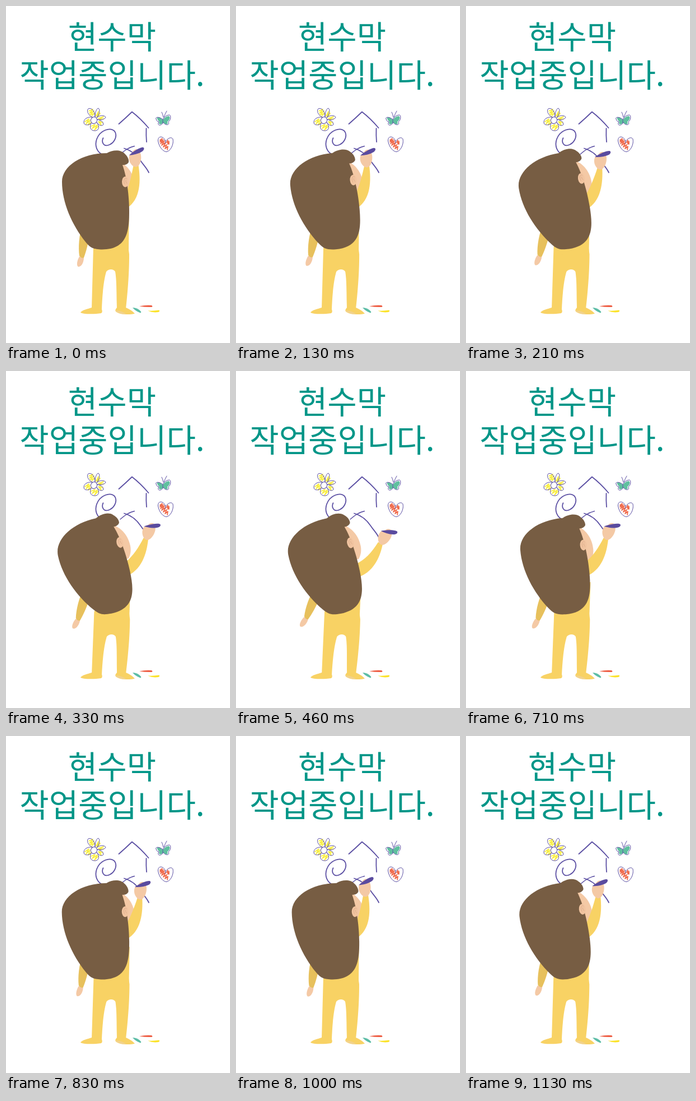
Write an HTML page that moves like this. It is 400x600 px and loops after 1.18 s.

```html
<!DOCTYPE html>
<html lang="ko">
<head>
<meta charset="utf-8">
<title>현수막 작업중입니다.</title>
<style>
html, body { margin: 0; width: 100%; height: 100%; overflow: hidden; background: #fff; }
svg { display: block; width: 100vw; height: 100vh; }
text { font: 400 57px "Noto Sans CJK KR", "Noto Sans CJK", sans-serif; fill: #009688; text-anchor: middle; }
.ink { fill: none; stroke: #5b4fa3; stroke-width: 1.8; stroke-linecap: round; stroke-linejoin: round; }
.thin { stroke-width: 1; }
.wax { fill: none; stroke-width: 1.7; stroke-linecap: round; stroke-linejoin: round; }
.cloth { fill: #f8d264; }
.skin { fill: #f4c9a5; }
</style>
</head>
<body>
<svg viewBox="0 0 400 600">
  <text x="189.5" y="75.5">현수막</text>
  <text x="189.5" y="143.5">작업중입니다.</text>

  <g id="flower">
    <path class="wax" stroke="#f9ee3e" d="M148 187l7-3-6 7 8-4-7 7 8-3-5 5M161 196l4-8-2 10 5-7M165 200l9-3-8 5 8-1M165 206l5 6-3-7 5 3M152 214l7-3-5 7 9-6-5 9 7-7M141 206l7-5-5 9 7-7-3 9 5-5"/>
    <g class="ink thin">
      <path d="M154 198C147 195 143 186 147 183C153 180 159 188 159 197"/>
      <path d="M159 197C159 189 162 182 165 182C169 185 166 194 162 199"/>
      <path d="M162 199C166 194 176 194 178 198C177 202 169 203 163 202"/>
      <path d="M163 202C169 203 174 206 174 211C171 215 165 212 162 207"/>
      <path d="M162 207C167 213 167 221 160 222C152 223 148 217 152 209"/>
      <path d="M152 209C147 213 139 213 139 207C139 200 147 197 154 198"/>
      <ellipse cx="157" cy="203.500" rx="5.500" ry="6" transform="rotate(25 157 203.500)"/>
    </g>
  </g>

  <g id="house" class="ink">
    <path d="M201.500 210Q213 200 225 188.500Q240 200 254.500 217"/>
    <path d="M250.500 218Q250 230 251 242"/>
  </g>

  <g id="butterfly">
    <path fill="#5fbf9f" d="M280 203C276 197 268 197 270 201Q272 205 274 206C271 211 277 213 281 207C284 212 291 212 288 206C293 203 294 196 290 196Q284 197 280 203Z"/>
    <g class="ink thin">
      <path d="M280 202C275 197 266 197 268 201Q269 206 273 206C269 212 276 216 281 207C284 213 293 213 290 206C295 203 295 193 291 194Q284 195 280 202V208"/>
      <path d="M281 198Q280 192 278 189M282 198Q284 192 287 187"/>
    </g>
  </g>

  <g id="heart">
    <path class="wax" stroke="#f0694a" d="M275 239l4-3-4 6 6-4-5 7 7-5-5 8 7-5-4 8 6-4-3 7 5-4-1 6M287 243l2-4 0 7 2-5 0 5"/>
    <path class="ink thin" d="M285 241C282 231 271 230 271.500 240C273 251 281 260 287 259.500C294 258 300 246 298 237C296 232 286 235 284 245"/>
  </g>

  <g id="lines" class="ink">
    <path d="M173.500 235C170 242 174 250 182 248C193 245 200 232 194 223C186 215 168 221 162 237C158 248 162 259 171 264"/>
    <path stroke-width="1.300" d="M204 264Q217 252 229.500 249.500"/>
    <path d="M211 253.500C224 257 233 265 240 275C246 284 251 288 255 296.500"/>
  </g>

  <g id="crayons">
    <path fill="#ee5f45" d="M238 534.500Q250 532 260 533Q263 535 260 536Q249 536.500 238 534.500Z"/>
    <path fill="#5cbda6" d="M226 537Q235 537 241 544Q242 547 239 546Q231 543 226 537Z"/>
    <path fill="#fbe32a" d="M253.500 542.500Q264 543 273 541.500Q276 543 272 545Q261 546.500 253.500 542.500Z"/>
  </g>

  <g id="leftArm">
    <path class="skin" d="M131 446C127 453 125.500 461 128.500 464C134 465.500 139 457 139 448Z"/>
    <path fill="#e7c05c" d="M137 388C130 408 129 430 131 445Q135 450 139 448C143 438 147 422 149 408L155 390Z"/>
  </g>

  <path class="cloth" d="M153 537C144 540 137 541 133 545.500C136 549 158 549 170 547Q173 545 171 540ZM198 537Q194 541 196 544C203 550 222 550 230 547.500Q224 541 214 537Z"/>
  <path fill="#f2d28b" d="M195 542Q204 541 215 548.500Q201 549.500 195 542Z"/>
  <path id="legs" class="cloth" d="M156 428L153 539Q162 544 171 540C172 515 174 490 179 473C183 467.500 192 467.500 195 473C198 490 197 515 198 538Q206 543 214 539C217 510 220 480 220 442L218 428Z"/>
  <path id="torso" class="cloth" d="M158 375L156.500 440Q188 448 219 440L219.500 375Z"/>

  <path id="face" class="skin" d="M204 278C222 287 230 305 230 322C230 332 226 340 222 344L205 344Z"/>
  <path id="sleeve" class="cloth"/>
  <g id="hand">
    <path class="skin" d="M219.500 266C217 274 222 282 227 285Q231 287.500 235 285C240 281 242 270 239.500 262L236 256C232 253 227 255 225 260Z"/>
    <path fill="#5a4b9f" d="M219 265.500C227 258 238 251.500 243 251C246.500 251 246.500 255 243 258C236 263 226 265 219 265.500Z"/>
  </g>
  <g id="hair">
    <path fill="#775d43" d="M100 313C100 285 135 262 180 262C190 256 205 255 212 263C217 267 220 274 219 278C217 282 212 283.500 208 283C216 305 220 340 220 366C220 402 216 433 172 433.500C156 433 151 431 142 420C118 390 100 350 100 313Z"/>
    <ellipse cx="213" cy="313" rx="6" ry="9.500" fill="#f1c4a0"/>
    <path fill="none" stroke="#d9a988" stroke-width=".8" d="M216 308C212 304 209 311 212 317M214 310Q213 313 216 316"/>
  </g>
</svg>
<script>
const LOOP = 1180, FPS = 24, CYCLE = 23;
const el = id => document.getElementById(id);
const [leftArm, legs, torso, face, sleeve, hand, hair] =
  ["leftArm", "legs", "torso", "face", "sleeve", "hand", "hair"].map(el);

// pose keys: [step, degrees], repeating every CYCLE steps
const headKeys = [[0, 0], [1, .5], [4, 6.8], [5, 9], [8, 12], [14, 8.5], [20, .4]];
const armKeys = [[0, 0], [1, .8], [4, 4], [5, 5.2], [8, 9.8], [14, 17], [20, 1.7]];

// sleeve outline with the arm drawn in and reached out
const sleeveIn = [[227, 284], [236, 283], [240, 308], [242, 345], [214, 361],
  [200, 345], [214, 335], [221, 315], [224, 300], [227, 284]];
const sleeveOut = [[255, 306], [263, 310], [257, 338], [242, 362], [214, 369],
  [200, 355], [214, 344], [230, 338], [243, 325], [255, 306]];

const mix = (a, b, t) => a + (b - a) * t;

// periodic cubic through the keys
function spline(keys, x) {
  const n = keys.length;
  const key = i => {
    const [k, v] = keys[(i + n) % n];
    return [k + CYCLE * Math.floor(i / n), v];
  };
  const slope = i => (key(i + 1)[1] - key(i - 1)[1]) / (key(i + 1)[0] - key(i - 1)[0]);
  let i = n - 1;
  while (keys[i][0] > x) i--;
  const [x0, y0] = key(i), [x1, y1] = key(i + 1);
  const w = x1 - x0, t = (x - x0) / w, s = 1 - t;
  return y0 * s * s * (1 + 2 * t) + y1 * t * t * (3 - 2 * t)
    + w * t * s * (s * slope(i) - t * slope(i + 1));
}

function pose(step) {
  const k = step % CYCLE;
  const reach = (1 - Math.cos(2 * Math.PI * (k - 1) / CYCLE)) / 2;
  const drop = reach * (.65 + .35 * reach);
  const set = (node, value) => node.setAttribute("transform", value);

  const tilt = `rotate(${-spline(headKeys, k)} 172 355)`;
  set(hair, tilt);
  set(face, tilt);
  set(leftArm, `rotate(${spline(armKeys, k)} 157 406)`);

  const sway = 2 * reach;
  set(legs, `matrix(1 0 ${-sway / 105} 1 ${sway * 545 / 105} 0)`);
  set(torso, `translate(${sway * .8} 0) rotate(${2.5 * reach} 188 440)`);

  const p = sleeveIn.map(([x, y], i) =>
    mix(x, sleeveOut[i][0], reach) + " " + mix(y, sleeveOut[i][1], drop));
  sleeve.setAttribute("d", `M${p[0]}L${p[1]}C${p.slice(2, 5)}L${p[5]}L${p[6]}C${p.slice(7)}Z`);
  set(hand, `translate(${29 * reach} ${24 * drop}) rotate(${33 * reach} 231 285)`);
}

function draw(now) {
  const t = now % LOOP;
  // steps of 1/24 s, held on a 10 ms clock
  pose(Math.floor((Math.floor(t / 10) * 10 + 4.99) * FPS / 1000));
  requestAnimationFrame(draw);
}

pose(0);
requestAnimationFrame(draw);
</script>
</body>
</html>
```
